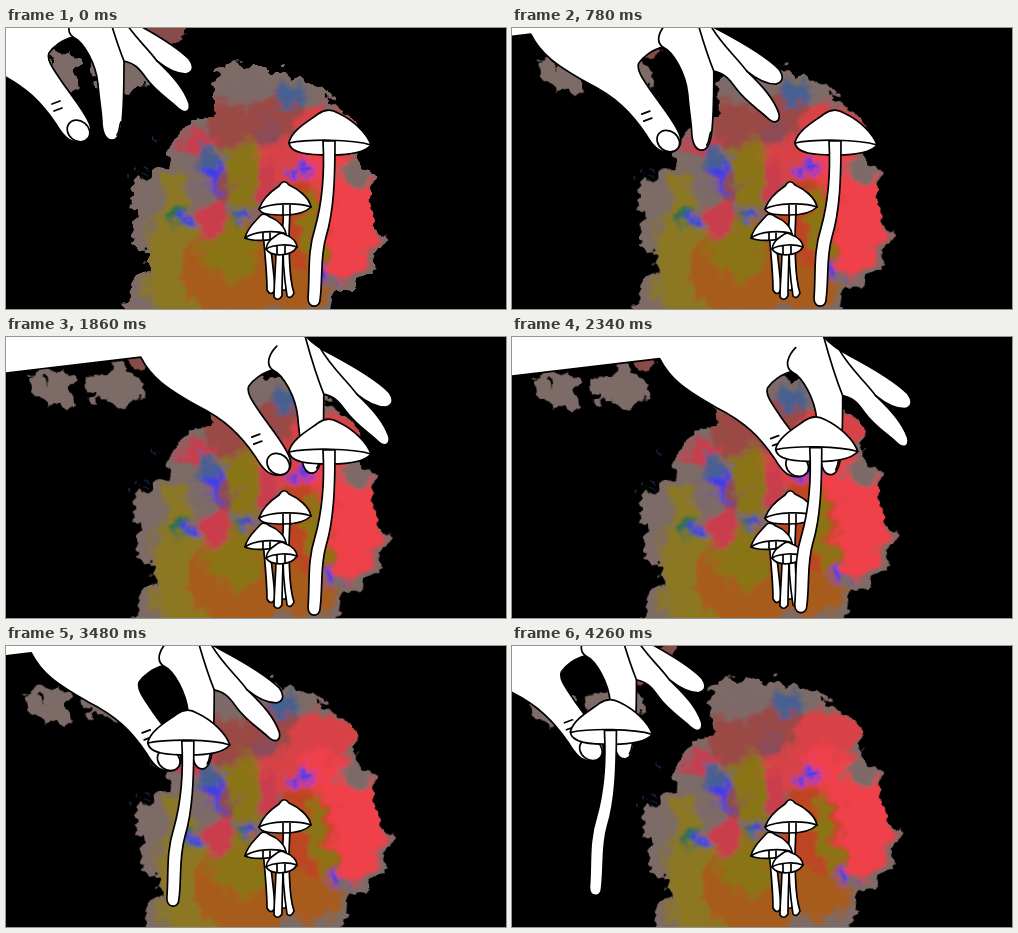
Animation of 500 by 281 pixels, one loop 4320 ms. Source, as an HTML page:

```html
<!DOCTYPE html>
<html lang="en">
<head>
<meta charset="utf-8">
<title>Picking mushrooms</title>
<style>
  html, body { margin: 0; height: 100%; overflow: hidden; background: #000; }
  svg { display: block; width: 100vw; height: 100vh; }
  .ink { fill: #fff; stroke: #000; stroke-width: 1.7; stroke-linejoin: round; stroke-linecap: round; }
  .line { fill: none; }
</style>
</head>
<body>
<svg viewBox="0 0 500 281">
  <defs>
    <filter id="rough" filterUnits="userSpaceOnUse" x="-40" y="-60" width="580" height="420" color-interpolation-filters="sRGB">
      <feTurbulence type="fractalNoise" baseFrequency=".055" numOctaves="3" seed="8"/>
      <feDisplacementMap in="SourceGraphic" scale="30" xChannelSelector="R" yChannelSelector="G"/>
    </filter>
    <filter id="soft" filterUnits="userSpaceOnUse" x="-40" y="-60" width="580" height="420">
      <feGaussianBlur stdDeviation="3"/>
    </filter>
    <clipPath id="edge">
      <path id="blob" d="M205 45L225 36 250 40 275 40 300 57 325 72 346 88 351 112 359 132 370 153 365 182 378 208 371 236 352 260 326 261 321 300 321 340 125 340 119 272 122 257 140 242 144 223 126 214 129 190 124 165 136 150 158 145 160 125 173 109 190 93 210 85 213 65Z"/>
    </clipPath>
  </defs>

  <g id="paint">
    <g filter="url(#rough)">
      <g fill="#7d6b67">
        <use href="#blob"/>
        <path d="M27 25L48 30 62 22 77 35 70 57 44 60 34 46Z"/>
        <path d="M84 32L104 28 122 22 140 38 143 55 126 66 106 57 87 55Z"/>
        <path fill="#874b49" d="M125 -8H186L172 12 146 25 128 16Z"/>
      </g>
      <g clip-path="url(#edge)"><g id="patches" filter="url(#soft)"></g></g>
      <g fill="#18284c">
        <circle cx="118" cy="144" r="2"/>
        <circle cx="134" cy="145" r="2"/>
        <circle cx="145" cy="140" r="1.5"/>
        <circle cx="149" cy="112" r="1.3"/>
      </g>
    </g>
  </g>

  <g id="hand" class="ink">
    <path d="M-60 43L135 20C145 40 160 51 192 69C220 83 235 98 250 120C257 132 263 138 272 138C282 138 287 131 284 121C280 109 268 95 256 78C248 66 240 56 243 49C247 43 257 35 267 33C278 38 290 60 292 80C293 95 296 110 296 120C297 130 300 136 306 136C313 136 315 126 316 118C318 100 318 75 318 57C328 59 333 64 340 74C350 88 365 97 373 105C379 110 385 108 383 99C378 85 368 73 351 57C362 66 372 70 380 70C388 68 388 62 383 55C370 42 340 25 325 17C315 12 306 6 298 -3L290 -40H-60Z"/>
    <path class="line" d="M299 -2C305 20 312 42 318 57M351 57C340 42 325 30 314 10M271 9C264 16 259 27 267 33M311 131C314 127 313 122 315 118M246 100L254 97M248 107L256 104"/>
    <ellipse cx="272.500" cy="127" rx="12" ry="10" transform="rotate(38 272.500 127)"/>
  </g>

  <g class="ink">
    <path d="M277 176C278 190 277 200 275 212L272 262H280L283 212C283 200 284 190 284 176Z"/>
    <path d="M253 181C257 169 267 162 273 158Q278 150 283 157C292 161 303 169 305 179C299 185 289 187 278 187C267 187 255 187 253 181Z"/>
    <path class="line" d="M253 181C264 175 292 174 305 179M277 177V187M284 177V187"/>

    <path d="M257 205C259 225 261 245 261 262Q265 269 269 262C268 240 264 222 264 205Z"/>
    <path d="M239 210C241 200 249 194 254 188Q258 184 264 189C272 192 279 199 280 206C274 213 247 214 239 210Z"/>
    <path class="line" d="M239 210C248 203 270 202 280 206M257 205V212M264 205V212"/>

    <path d="M270 220C270 238 268 255 268 269Q272 274 276 268C276 250 277 237 277 220Z"/>
    <path d="M277 220C277 235 278 245 279 253L281 268Q285 272 288 265C283 250 284 235 283 220Z"/>
    <path d="M260 221C261 213 267 210 271 207Q275 203 280 207C287 209 291 215 291 219C285 229 265 229 260 221Z"/>
    <path class="line" d="M260 221C268 216 283 216 291 219M271 218V226M279 218V226"/>
  </g>

  <g id="tall" class="ink">
    <path d="M283 114C287 101 303 93 312 86Q322 79 332 85C347 92 361 105 365 117C360 123 347 127 325 127C304 127 283 126 283 114Z"/>
    <path class="line" d="M283 115C303 111 346 111 365 117"/>
    <path d="M317 113C319 150 316 175 309 200C301 225 304 245 302 270C302 281 314 280 314 272C317 250 314 230 320 209C328 183 329 150 329 113Z"/>
  </g>
</svg>
<script>
  const LOOP = 4320, STEP = 60, HALF = LOOP / 2;
  const get = id => document.getElementById(id);

  // Paint patches: colour, then cx, cy, rx, ry for each ellipse
  const patches = [
    ['#8c7820', 172, 240, 30, 65, 168, 180, 14, 35],
    ['#9a4a45', 255, 95, 52, 36],
    ['#d84347', 318, 110, 34, 32, 270, 135, 28, 22],
    ['#f04048', 338, 192, 36, 56, 312, 150, 25, 30],
    ['#a85b1c', 230, 245, 58, 50, 295, 245, 26, 45],
    ['#bd4420', 292, 195, 30, 44],
    ['#8a7414', 236, 145, 20, 32, 222, 220, 28, 32, 305, 200, 10, 40],
    ['#c93c4e', 205, 180, 17, 32, 195, 115, 18, 10, 258, 160, 10, 25],
    ['#7d6b67', 348, 143, 18, 13, 192, 165, 14, 16, 240, 60, 28, 16],
    ['#8b4c58', 215, 155, 12, 16, 260, 105, 16, 12],
    ['#456092', 285, 67, 16, 10, 200, 128, 12, 9],
    ['#35704a', 174, 190, 13, 10, 232, 190, 9, 6],
    ['#3c3cea', 296, 140, 13, 7, 206, 141, 11, 7, 181, 191, 6, 6, 239, 191, 7, 5, 318, 246, 7, 7, 208, 154, 5, 8]
  ];
  let shapes = '';
  for (const [fill, ...n] of patches)
    for (let i = 0; i < n.length; i += 4)
      shapes += `<ellipse fill="${fill}" cx="${n[i]}" cy="${n[i + 1]}" rx="${n[i + 2]}" ry="${n[i + 3]}"/>`;
  get('patches').innerHTML = shapes;

  const move = (id, x, y) => get(id).setAttribute('transform', `translate(${x} ${y})`);

  function draw(now) {
    const t = Math.floor(now % LOOP / STEP) * STEP;
    const reach = 1 - Math.abs(t - HALF) / HALF;
    const pulled = Math.max(0, t - HALF) / HALF;
    const drift = t / LOOP;
    move('hand', 232 * reach - 200, 28 * reach - 24);
    move('tall', -231 * pulled, -29.5 * pulled);
    get('paint').setAttribute('transform', `translate(${4 * drift} 0) rotate(${-8 * drift} 205 160)`);
  }

  const start = performance.now();
  function tick() {
    draw(performance.now() - start);
    requestAnimationFrame(tick);
  }
  tick();
</script>
</body>
</html>
```
